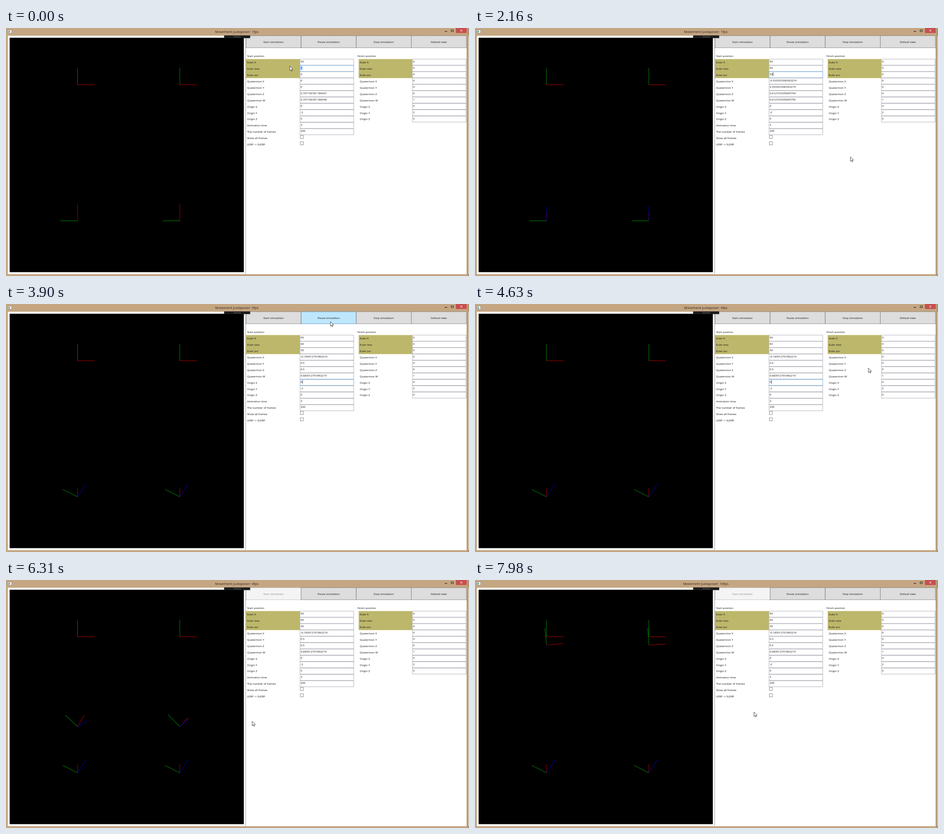
These frames come from a looping animation (1023 by 547 pixels, 8 s). An HTML page:

```html
<!DOCTYPE html>
<html lang="en">
<head>
<meta charset="utf-8">
<title>Movement Juxtaposer</title>
<style>
  html, body { margin: 0; width: 100%; height: 100%; overflow: hidden; background: #c5a682; }
  svg { display: block; width: 100%; height: 100%; }
  text { font: 6.1px "Open Sans", "Noto Sans", sans-serif; fill: #111; white-space: pre; }
  .title { font-size: 7.5px; fill: #2a241c; }
  .mid { text-anchor: middle; }
</style>
</head>
<body>
<svg id="stage" viewBox="0 0 1023 547" preserveAspectRatio="none"></svg>
<script>
const LOOP = 8000;
const stage = document.getElementById('stage');

function el(tag, attrs = {}, text = '') {
  const node = document.createElementNS('http://www.w3.org/2000/svg', tag);
  set(node, attrs);
  node.textContent = text;
  stage.appendChild(node);
  return node;
}
function set(node, attrs) {
  for (const k in attrs) node.setAttribute(k, attrs[k]);
}
const rect = (x, y, width, height, fill, more = {}) => el('rect', { x, y, width, height, fill, ...more });
const label = (x, y, s, cls = '') => el('text', { x, y, class: cls }, s);
const path = (d, stroke, more = {}) => el('path', { d, stroke, fill: 'none', ...more });

// ---- window frame
rect(0, 0, 1023, 547, '#c5a682');
rect(1021, 17, 2, 525, '#eee6d2');
rect(1020.6, 0, 0.8, 547, '#6d5d48');
rect(4, 17, 1013.5, 526, '#fff');
rect(8, 21.5, 517.5, 517, '#000');
rect(5, 4.5, 7.5, 7, '#f4f7f9', { stroke: '#77807f', 'stroke-width': 0.7 });
rect(6.3, 6.5, 2.5, 3.5, '#3c8f9c');
const title = label(510, 11.1, '', 'title mid');
rect(994, 0, 24, 11, '#c75050');
path('M1004 3.7l4 4m0-4l-4 4', '#fff', { 'stroke-width': 1 });
path('M969.5 7.5h5', '#222', { 'stroke-width': 1.4 });
path('M983.5 4h5v4h-5z', '#222', { 'stroke-width': 1 });
path('M529.6 17V543', '#858585', { 'stroke-width': 0.8 });

// ---- toolbar buttons
const buttons = ['Start simulation', 'Pause simulation', 'Stop simulation', 'Default view'].map((name, i) => {
  const x = 530 + i * 121.8;
  return {
    x,
    box: rect(x + 0.3, 17, 121.5, 26.7, '#ddd', { 'stroke-width': 0.7 }),
    text: label(x + 60.9, 32.9, name, 'mid')
  };
});
rect(482, 16.3, 57.5, 6, '#1c1c1e');
path('M503 18.6h16M503 20.2h16', '#77777a', { 'stroke-width': 0.8, 'stroke-dasharray': '1 .7' });

// ---- form
const PITCH = 13.95, TOP = 68.7;
const names = ['Euler fi', 'Euler teta', 'Euler psi', 'Quaternion X', 'Quaternion Y', 'Quaternion Z',
  'Quaternion W', 'Origin X', 'Origin Y', 'Origin Z', 'Animation time', 'The number of frames',
  'Show all frames', 'LERP -> SLERP'];
const rowY = i => TOP + i * PITCH;

function column(labelX, fieldX, khakiX, count) {
  rect(khakiX, 68.5, fieldX - khakiX - 0.3, 42, '#bdb76b');
  names.slice(0, count).forEach((n, i) => label(labelX, rowY(i) + 9.2, n));
  const fields = [];
  for (let i = 0; i < Math.min(count, 12); i++) {
    fields.push({
      box: rect(fieldX, rowY(i), 118.5, 13.3, '#fff', { stroke: '#a0a2ac', 'stroke-width': 0.8 }),
      mark: rect(fieldX + 1, rowY(i) + 1.6, 4.2, 8.2, '#8fc3f7', { opacity: 0 }),
      text: label(fieldX + 1.2, rowY(i) + 7.3, '')
    });
  }
  return fields;
}
label(532.7, 64.2, 'Start position');
label(776.4, 64.2, 'Finish position');
const start = column(532.7, 649.8, 530, 14);
column(781.7, 898, 779.3, 10).forEach((f, i) => f.text.textContent = [0, 0, 0, 0, 0, 0, 1, 0, 2, 0][i]);
for (const i of [12, 13]) rect(650.3, rowY(i) + 0.9, 6.8, 6.8, '#fff', { stroke: '#707070', 'stroke-width': 0.8 });
const caret = rect(0, 0, 0.8, 8, '#000');

// ---- axes
const COLORS = ['#900000', '#007400', '#00008a'];
const gizmo = () => [0, 1, 2].map(() => el('line', { 'stroke-width': 1.2 }));
const still = [158, 384].map(x => ({ x, from: gizmo(), to: gizmo(), move: gizmo() }));

function axesOf([x, y, z, w]) {
  const n = Math.hypot(x, y, z, w);
  x /= n; y /= n; z /= n; w /= n;
  return [
    [1 - 2 * (y * y + z * z), 2 * (x * y + z * w), 2 * (x * z - y * w)],
    [2 * (x * y - z * w), 1 - 2 * (x * x + z * z), 2 * (y * z + x * w)],
    [2 * (x * z + y * w), 2 * (y * z - x * w), 1 - 2 * (x * x + y * y)]
  ];
}
function eulerQuat(fi, teta, psi) {
  const h = Math.PI / 360;
  const [a, b, c] = [fi * h, teta * h, psi * h];
  const [ca, sa, cb, sb, cc, sc] = [a, b, c].flatMap(v => [Math.cos(v), Math.sin(v)]);
  return [
    ca * cb * sc - sa * sb * cc,
    ca * sb * cc + sa * cb * sc,
    sa * cb * cc - ca * sb * sc,
    ca * cb * cc + sa * sb * sc
  ];
}
function drawAxes(lines, ox, oy, quat) {
  const sorted = axesOf(quat).map((v, i) => ({ v, i })).sort((p, q) => p.v[2] - q.v[2]);
  lines.forEach((line, k) => {
    const { v, i } = sorted[k];
    set(line, { x1: ox, y1: oy, x2: ox + v[0] * 37.5, y2: oy - v[1] * 37.5, stroke: COLORS[i] });
  });
}

// ---- pointer
const arrow = path('M0 0V10L2.3 7.9 3.8 11.2 5.3 10.6 3.8 7.3H7Z', '#222', { fill: '#fff', 'stroke-width': 0.8 });
const beam = path('M-2-4h1.5L0-3.5.5-4H2M0-3.5v7M-2 4h1.5L0 3.5.5 4H2', '#444', { 'stroke-width': 0.8 });
const ROUTE = [
  [0, 627, 84], [40, 627, 84], [220, 669, 103], [370, 669, 103], [600, 669, 109], [1700, 669, 109],
  [1940, 871, 324], [2050, 873, 318], [2400, 690, 176], [2520, 680, 174], [2740, 745, 215],
  [2820, 777, 240], [3000, 877, 150], [3290, 716.5, 38], [3890, 716.5, 38], [4280, 932, 425],
  [4600, 875, 150], [4780, 800, 38], [4900, 680, 32], [5000, 560, 27], [5040, 543, 25],
  [5180, 543, 25], [5340, 576, 32], [5480, 587, 44], [5600, 585, 110], [5870, 544, 311.5],
  [7130, 544, 311.5], [7600, 582, 300], [7980, 616.5, 291], [8000, 616.5, 291]
];
function pointer(t) {
  const i = Math.max(1, ROUTE.findIndex(p => p[0] > t));
  const [t0, x0, y0] = ROUTE[i - 1], [t1, x1, y1] = ROUTE[i];
  let u = Math.max(0, (t - t0) / (t1 - t0));
  u = u * u * (3 - 2 * u);
  return [x0 + (x1 - x0) * u, y0 + (y1 - y0) * u];
}
function fieldAt([x, y]) {
  if (x < 650 || x > 768) return -1;
  const i = Math.floor((y - TOP) / PITCH);
  return i >= 0 && i < 12 ? i : -1;
}

// latest value whose time has come
const at = (t, steps) => steps.reduce((v, [when, next]) => t >= when ? next : v, null);

const TETA_SET = 950, PSI_SET = 2500, RUN = 5380;
const FPS = [[0, 1], [550, 0], [1550, 1], [3550, 0], [5660, 4], [6660, 13], [7660, 16]];
const TETA = [[0, '0'], [450, '6'], [650, '60']];
const PSI = [[0, '0'], [1450, '3'], [1640, '30']];
const QUATS = [
  [0, ['0', '0', '0.707106781186547', '0.707106781186548']],
  [TETA_SET, ['-0.353553390593274', '0.353553390593274', '0.612372435695794', '0.612372435695795']],
  [PSI_SET, ['-0.183012701892219', '0.5', '0.5', '0.683012701892219']]
];

function progress(t) {
  if (t < 5450) return -1;
  if (t < 6310) return 0.0167 + 0.0808 * Math.floor((t - 5450) / 215);
  const step = 1670 / 30;
  return 0.34 + 0.02 * Math.floor((t - 6310) / step + 0.01);
}

function drawForm(t, hot) {
  const values = ['90', at(t, TETA), at(t, PSI), ...at(t, QUATS), '0', '-2', '0', '3', '200'];
  const focus = at(t, [[0, 1], [TETA_SET, 2], [PSI_SET, 7], [RUN, -1]]);
  const marked = (focus === 1 && t < 450) || (focus === 2 && t < 1450);
  const hover = fieldAt(hot);
  start.forEach((f, i) => {
    f.text.textContent = values[i];
    const lit = i === focus || i === hover;
    set(f.box, { stroke: lit ? '#569de5' : '#a0a2ac' });
    set(f.mark, { opacity: marked && i === focus ? 1 : 0 });
    set(f.text, { style: marked && i === focus ? 'fill:#1566b7' : '' });
  });
  const blink = focus !== 7 || Math.floor((t - PSI_SET) / 500) % 2 === 0;
  const shown = focus >= 0 && !marked && blink;
  set(caret, { opacity: shown ? 1 : 0 });
  if (shown) set(caret, { x: 651.2 + values[focus].length * 3.5, y: rowY(focus) + 1.4 });
}

function drawButtons(t, [px, py]) {
  buttons.forEach(({ x, box, text }, i) => {
    const off = i === 0 && t >= RUN;
    const lit = !off && py > 17 && py < 44 && px >= x && px < x + 121.8;
    set(box, { fill: off ? '#f4f4f4' : lit ? '#bee6fd' : '#ddd', stroke: off ? '#adb2b5' : lit ? '#3c7fb1' : '#707070' });
    set(text, { style: off ? 'fill:#858585' : '' });
  });
}

function drawScene(t) {
  const angles = [90, t < TETA_SET ? 0 : 60, t < PSI_SET ? 0 : 30];
  const first = eulerQuat(...angles);
  const p = progress(t);
  still.forEach(({ x, from, to, move }, side) => {
    drawAxes(from, x, 425.3, first);
    drawAxes(to, x, 125.2, [0, 0, 0, 1]);
    move.forEach(line => set(line, { opacity: p < 0 ? 0 : 1 }));
    if (p < 0) return;
    // left blends Euler angles, right blends quaternions
    const quat = side === 0
      ? eulerQuat(...angles.map(a => a * (1 - p)))
      : first.map((v, i) => v * (1 - p) + (i === 3 ? p : 0));
    drawAxes(move, x, 425.3 - 300 * p, quat);
  });
}

function draw(t) {
  title.textContent = `Movement Juxtaposer: ${at(t, FPS)}fps`;
  const pos = pointer(t);
  const late = pointer(Math.max(0, t - 80));
  drawForm(t, late);
  drawButtons(t, late);
  drawScene(t);
  const typing = fieldAt(pos) >= 0;
  const transform = `translate(${pos[0]} ${pos[1]})`;
  set(arrow, { transform, opacity: typing ? 0 : 1 });
  set(beam, { transform, opacity: typing ? 1 : 0 });
}

const begin = performance.now();
function tick() {
  draw((performance.now() - begin) % LOOP);
  requestAnimationFrame(tick);
}
tick();
</script>
</body>
</html>
```
